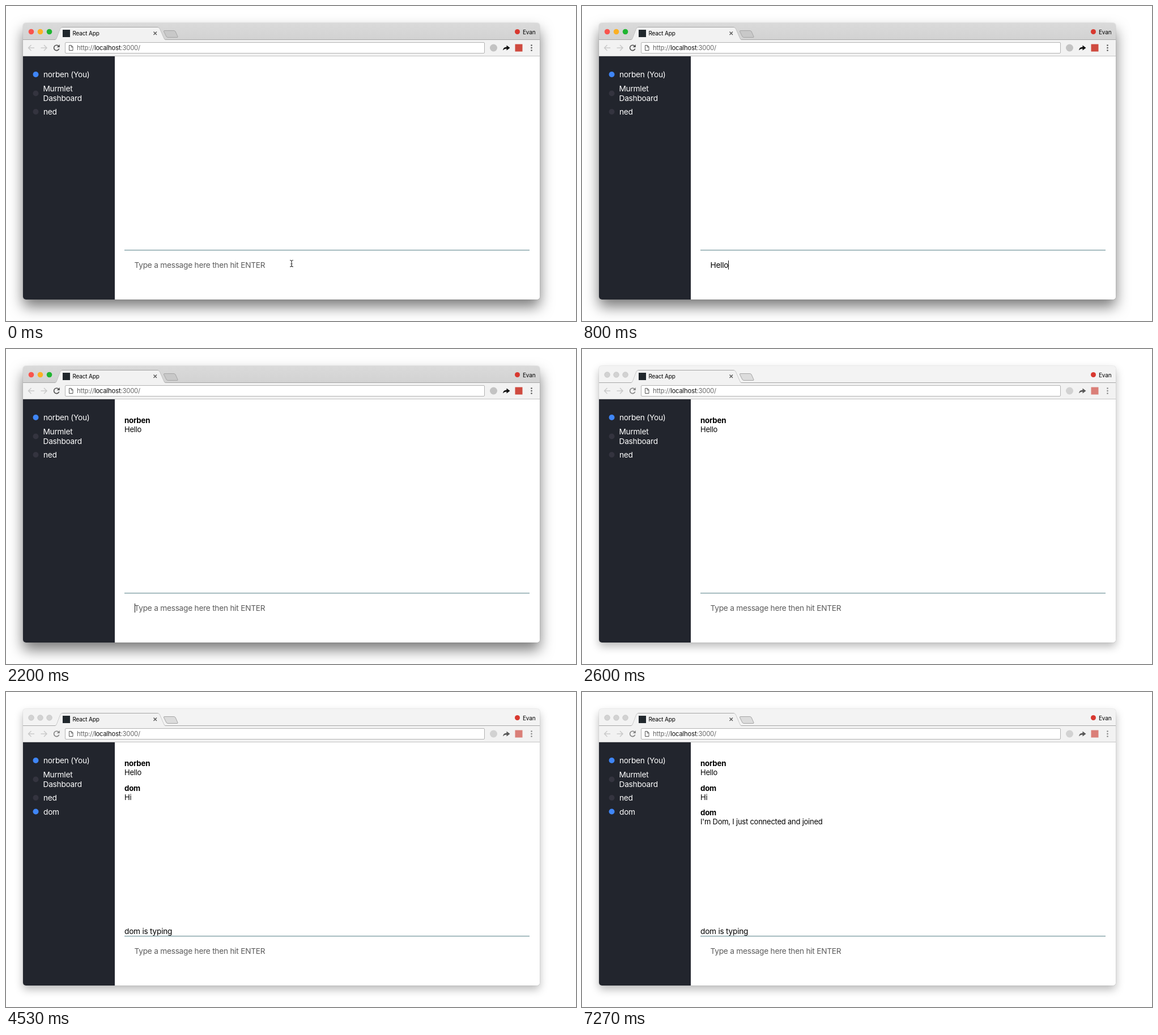
These frames come from a looping animation (1006 px wide and 557 px high, 8000 ms). An HTML page:

```html
<!DOCTYPE html>
<html lang="en">
<head>
<meta charset="utf-8">
<title>Chat demo</title>
<style>
  html, body { margin: 0; width: 100%; height: 100%; overflow: hidden; background: #fff; }
  #shadow { position: absolute; left: 30px; top: 30px; width: 912px; height: 489px; border-radius: 5px;
    box-shadow: 0 7px 15px rgba(0,0,0,.27), 0 0 1px rgba(0,0,0,.5); }
  .active #shadow { box-shadow: 0 13px 25px rgba(0,0,0,.52), 0 0 1px rgba(0,0,0,.5); }
  svg { position: absolute; left: 0; top: 0; width: 1006px; height: 557px; }
  text { font: 13.7px Inter, "Open Sans", sans-serif; letter-spacing: -.018em; white-space: pre; }
  .side text { fill: #fff; }
  .chat text { font-size: 13px; }
  .chat .who { font-size: 13.3px; font-weight: 700; }
  .small { font-size: 10px; }
  .url { font-size: 11.3px; fill: #666; }
  .url tspan { fill: #111; }
  .bar { fill: #f3f3f3; }
  .active .bar { fill: url(#title); }
  .plus { fill: #dcdcdc; }
  .active .plus { fill: #c8c8c8; }
  .lights circle { fill: #d2d2d2; stroke: #bdbdbd; stroke-width: .6; }
  .active .lights circle { stroke: none; }
  .active .lights :nth-child(1) { fill: #f9544d; }
  .active .lights :nth-child(2) { fill: #fbb024; }
  .active .lights :nth-child(3) { fill: #1fb531; }
  .icons { opacity: .68; }
  .active .icons { opacity: 1; }
  .on { fill: #3f86f7; }
  .off { fill: #34343f; }
</style>
</head>
<body class="active">
<div id="shadow"></div>
<svg viewBox="0 0 1006 557">
  <defs>
    <linearGradient id="title" x2="0" y2="1">
      <stop stop-color="#dadada"/><stop offset="1" stop-color="#d2d2d2"/>
    </linearGradient>
    <clipPath id="win"><rect x="30" y="30" width="912" height="489" rx="5"/></clipPath>
  </defs>

  <g clip-path="url(#win)">
    <rect x="30" y="30" width="912" height="489" fill="#fff"/>
    <rect class="bar" x="30" y="30" width="912" height="30"/>
    <rect x="30" y="59" width="912" height="30" fill="#f2f2f2"/>
    <path d="M30 59.5H87Q89 59 90 56L96 40Q97 37.500 100 37.500H267Q270 37.500 271 40L278 56Q279 59 281 59.500H942" fill="none" stroke="#a6a6a6"/>
    <path d="M87 60Q89 59 90 56L96 40Q97 38 100 38H267Q270 38 271 40L278 56Q279 59 281 60Z" fill="#f2f2f2"/>
    <path class="plus" d="M280 43.500H296Q298 43.500 299 45L303 54Q303.500 55.500 302 55.500H286Q284 55.500 283 54L278.500 45Q278 43.500 280 43.500Z" stroke="#a6a6a6"/>
    <path d="M30 88.500H942" stroke="#c4c4c4"/>
    <rect x="30" y="89" width="162" height="430" fill="#22252d"/>
  </g>

  <g class="lights">
    <circle cx="44.500" cy="45.500" r="4.800"/><circle cx="60.500" cy="45.500" r="4.800"/><circle cx="76.500" cy="45.500" r="4.800"/>
  </g>
  <rect x="100" y="42" width="13" height="13" fill="#20272c"/>
  <text class="small" x="117.500" y="52">React App</text>
  <path d="M260.500 45.500l5.500 5.500m0-5.500l-5.500 5.500" stroke="#555" stroke-width="1.300"/>
  <circle cx="902.500" cy="45.500" r="4.500" fill="#d8382f"/>
  <text class="small" x="912" y="49.500" font-weight="500">Evan</text>

  <rect x="104.500" y="64.500" width="740" height="19" rx="1.500" fill="#fff" stroke="#b2b2b2"/>
  <path d="M111.500 69.500h4l2.500 2.500v6.500h-6.500zM115 69.500v3h3" fill="none" stroke="#555"/>
  <text class="url" x="125" y="78">http://<tspan>localhost</tspan>:3000/</text>
  <g fill="none" stroke="#cacaca" stroke-width="1.500">
    <path d="M50 74H39.500M44.500 69l-5 5 5 5M61.500 74H72M67 69l5 5-5 5"/>
  </g>
  <g class="icons">
    <path d="M93.300 71.500A4.700 4.700 0 1 0 93.700 75.500" fill="none" stroke="#505050" stroke-width="1.600"/>
    <path d="M94.800 68v5h-5z" fill="#505050"/>
    <circle cx="860.500" cy="74" r="6.500" fill="#c3c3c3"/>
    <path d="M877 78.500Q877.500 72.500 883.500 72.500V69.500L889.500 74 883.500 78.500V75.500Q879.500 75.500 877 78.500Z" fill="#111"/>
    <rect x="898.500" y="67.500" width="13" height="13" fill="#cf4a3f"/>
    <g fill="#555"><circle cx="927.500" cy="69.500" r="1.300"/><circle cx="927.500" cy="74" r="1.300"/><circle cx="927.500" cy="78.500" r="1.300"/></g>
  </g>

  <g class="side">
    <circle class="on" cx="52.500" cy="121" r="5"/><text x="66" y="126">norben (You)</text>
    <circle class="off" cx="52.500" cy="154.500" r="5"/><text x="65.500" y="151">Murmlet</text><text x="65.500" y="168">Dashboard</text>
    <circle class="off" cx="52.500" cy="187" r="5"/><text x="66" y="192">ned</text>
    <g data-on="2730"><circle class="on" cx="52.500" cy="211.500" r="5"/><text x="66" y="216.500">dom</text></g>
  </g>

  <g class="chat">
    <g data-on="1400"><text class="who" x="209" y="131">norben</text><text x="209" y="147">Hello</text></g>
    <g data-on="4530"><text class="who" x="209" y="175">dom</text><text x="209" y="191">Hi</text></g>
    <g data-on="6800"><text class="who" x="209" y="218">dom</text><text x="209" y="234">I'm Dom, I just connected and joined</text></g>
  </g>

  <text data-on="4000 6930 7270" x="209" y="428">dom is typing</text>
  <path d="M209 431.700H924" stroke="#527c84" stroke-width="1.100"/>
  <text id="input" x="226.500" y="463"></text>
  <path id="caret" d="M.5 450v16" stroke="#111"/>
  <path id="beam" d="M-3-5.500Q0-5.500 0-3.500Q0-5.500 3-5.500M0-3.500V4M-3 6Q0 6 0 4Q0 6 3 6M-1.500 1H1.500" fill="none" stroke="#333" stroke-width="1.100"/>
  <path id="arrow" d="M951 443v14l3.300-3 2.200 5 2.300-1-2.200-5h4.400z" fill="#111" stroke="#fff" stroke-width=".8"/>
</svg>
<script>
  const LOOP = 8000;
  const KEYS = [200, 400, 530, 670, 800];
  const SENT = 1130, BLUR = 2600;
  const el = id => document.getElementById(id);
  const [input, caret, beam, arrow] = ['input', 'caret', 'beam', 'arrow'].map(el);
  const show = (node, on) => node.setAttribute('visibility', on ? 'visible' : 'hidden');
  const within = (t, a, b) => t >= a && t < b;

  // data-on lists the times at which a part is switched on, off, on...
  const timed = [...document.querySelectorAll('[data-on]')].map(node =>
    ({ node, flips: node.dataset.on.split(' ').map(Number) }));

  function draw(t) {
    document.body.classList.toggle('active', t < BLUR);
    for (const { node, flips } of timed) show(node, flips.filter(f => t >= f).length % 2);

    const typing = within(t, KEYS[0], SENT);
    const typed = typing ? 'Hello'.slice(0, KEYS.filter(k => t >= k).length) : '';
    input.textContent = typed || 'Type a message here then hit ENTER';
    input.setAttribute('fill', typed ? '#000' : '#5c5c5c');

    const caretX = typed ? Math.round(226 + input.getComputedTextLength()) : 227;
    caret.setAttribute('transform', `translate(${caretX})`);
    show(caret, within(t, KEYS[0], 1600) || within(t, 2130, BLUR));

    const leaving = within(t, 2070, 2130);
    beam.setAttribute('transform', `translate(${leaving ? 700 : 504} 455)`);
    show(beam, t < KEYS[0] || leaving);
    show(arrow, within(t, 2130, 2200));
  }

  const start = performance.now();
  function tick() {
    draw((performance.now() - start) % LOOP);
    requestAnimationFrame(tick);
  }
  tick();
</script>
</body>
</html>
```
